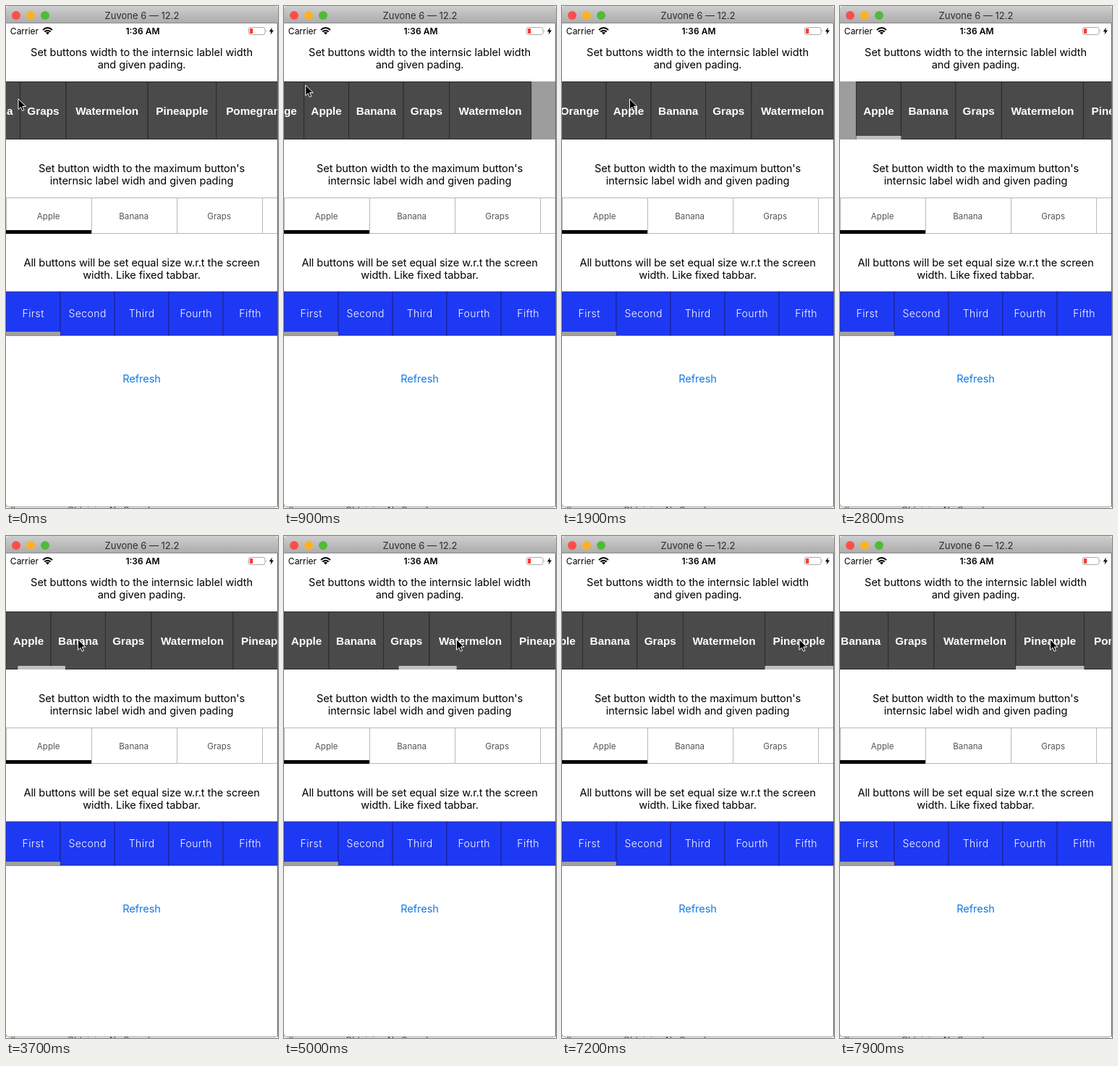
An HTML page that plays this animation: 376 px wide and 692 px high, repeating every 8 s.

```html
<!DOCTYPE html>
<html lang="en">
<head>
<meta charset="utf-8">
<style>
  html, body { margin: 0; width: 100%; height: 100%; overflow: hidden; background: #fff; }
  svg { display: block; width: 376px; height: 692px; }
  text { font-family: Inter, Roboto, sans-serif; text-anchor: middle; }
  .head { font-size: 14.6px; letter-spacing: -.07px; }
  .fruit { font: bold 15.3px "Liberation Sans", Arial, sans-serif; fill: #fff; }
  .cell { font-size: 11.6px; fill: #555; }
  .tab { font-size: 14px; font-weight: 300; letter-spacing: .45px; fill: #fff; }
  .status { font-size: 12px; }
  .behind { font-size: 12px; fill: #444; text-anchor: start; }
</style>
</head>
<body>
<svg viewBox="0 0 376 692">
  <defs>
    <linearGradient id="chrome" x2="0" y2="1">
      <stop stop-color="#cecece"/><stop offset="1" stop-color="#ababab"/>
    </linearGradient>
    <clipPath id="window"><rect width="375" height="692"/></clipPath>
    <clipPath id="edge"><rect y="690" width="376" height="2"/></clipPath>
  </defs>

  <!-- window frame -->
  <path d="M0 24V4Q0 0 4 0H372Q376 0 376 4V24Z" fill="url(#chrome)"/>
  <path d="M0 23.5H376" stroke="#8c8c8c"/>
  <g id="lights"></g>
  <text x="188" y="17.7" font-size="13" fill="#2c2c2c">Zuvone 6 — 12.2</text>
  <path d="M375.5 24V690" stroke="#666"/>
  <path d="M0 687Q0 690.5 4 690.5H371Q375.5 690.5 375.5 687" fill="none" stroke="#999"/>
  <g clip-path="url(#edge)">
    <text class="behind" x="0" y="698.5">allow</text>
    <text class="behind" x="85" y="698.5">Obtaining No Sound</text>
  </g>

  <!-- status bar -->
  <text class="status" x="25.5" y="38.7">Carrier</text>
  <text class="status" x="189" y="38.7" font-weight="600">1:36 AM</text>
  <g fill="none" stroke="#000" stroke-width="2">
    <path d="M51 33Q57.5 27 64 33M53.3 35.6Q57.5 31.8 61.7 35.6"/>
    <path d="M55 36.7Q57.5 34.6 60 36.7L57.5 39.4Z" fill="#000" stroke="none"/>
  </g>
  <rect x="335.5" y="29.5" width="22.5" height="10" rx="2.5" fill="none" stroke="#aaa"/>
  <rect x="337" y="31" width="4.3" height="7" rx="1" fill="#fb3b30"/>
  <path d="M359.5 32.7Q361.3 34.5 359.5 36.3Z" fill="#aaa"/>
  <path d="M368 29.5L363.8 35.2H366.5L365.7 39.5L370 33.6H367.2Z"/>

  <g id="heads"></g>

  <g clip-path="url(#window)">
    <rect y="104" width="375" height="80" fill="#9d9d9d"/>
    <g id="fruits"></g>
    <g id="cells"></g>
    <rect y="309" width="118" height="5"/>
    <g id="tabs"></g>
    <rect y="449" width="75" height="5" fill="#a0a0a0"/>
  </g>

  <text class="head" x="187.5" y="518.5" fill="#117ae4">Refresh</text>
  <path id="cursor" d="M0 0V14.6L3.4 11.4L5.6 16.5L8 15.5L5.8 10.5H10.4Z" stroke="#fff" stroke-linejoin="round"/>
</svg>
<script>
const $ = id => document.getElementById(id);

function add(parent, tag, attrs, content = '') {
  const el = document.createElementNS('http://www.w3.org/2000/svg', tag);
  for (const key in attrs) el.setAttribute(key, attrs[key]);
  el.textContent = content;
  $(parent).append(el);
  return el;
}
const label = (parent, cls, x, y, content) => add(parent, 'text', { class: cls, x, y }, content);
const box = (parent, x, y, width, height, fill, stroke) =>
  add(parent, 'rect', { x, y, width, height, fill, stroke });

['#fc4e49', '#fdb225', '#50bb38'].forEach((fill, i) =>
  add('lights', 'circle', { cx: 14 + 20 * i, cy: 13, r: 6, fill }));

function heading(y, ...lines) {
  lines.forEach((line, i) => label('heads', 'head', 187.6, y + 17.5 * i, line));
}
heading(68.8, 'Set buttons width to the internsic lablel width', 'and given pading.');
heading(228.8, "Set button width to the maximum button's", 'internsic label widh and given pading');
heading(358.8, 'All buttons will be set equal size w.r.t the screen', 'width. Like fixed tabbar.');

const fruits = {
  Apple: 62, Banana: 75.5, Graps: 63.5, Watermelon: 113, Pineapple: 94.5, Pomegranate: 124, Orange: 73
};
const names = Object.keys(fruits), widths = Object.values(fruits);
const starts = [];
let end = 0;
for (let i = 0; i < 11; i++) {
  const w = widths[i % 7];
  starts.push(end);
  box('fruits', end, 104.5, w, 79, '#4a4a4a', '#2b2b2b');
  label('fruits', 'fruit', end + w / 2, 150, names[i % 7]);
  end += w;
}
const marker = box('fruits', 0, 179, 62, 5, '#c0c0c0', 'none');

names.slice(0, 4).forEach((name, i) => {
  box('cells', i * 118 + .5, 264.5, 118, 49, '#fff', '#b8b8b8');
  label('cells', 'cell', i * 118 + 58.7, 293.6, name);
});
['First', 'Second', 'Third', 'Fourth', 'Fifth'].forEach((name, i) => {
  box('tabs', i * 75, 394, 75, 60, '#1e39f4', '#1a2391');
  label('tabs', 'tab', i * 75 + 37.7, 429.4, name);
});

const smooth = p => p * p * (3 - 2 * p);
const out = p => 1 - (1 - p) ** 2;
const mix = (a, b, p) => a + (b - a) * p;

const last = end - 375;                 // furthest regular scroll
const taps = [3600, 4200, 4885, 5900];  // taps on the second to fifth button

function draw() {
  const t = performance.now() % 8000;
  const ramp = (start, length, ease = smooth) =>
    ease(Math.min(1, Math.max(0, (t - start) / length)));

  // Flick to the end and bounce, drag back and bounce, reveal the tapped button, drag a little.
  const drag = 37.5 * ramp(7200, 550);
  const scroll = 117
    + (last + 49 - 117) * ramp(0, 1100, out) - 49 * ramp(1100, 700, out)
    - (last + 46) * ramp(2000, 650) + 46 * ramp(2650, 500, out)
    + (starts[5] - 375) * ramp(5900, 300) + drag;
  $('fruits').setAttribute('transform', `translate(${-scroll})`);

  const pos = taps.reduce((sum, tap) => sum + ramp(tap, 300), 0);
  const i = Math.floor(pos);
  marker.setAttribute('x', mix(starts[i], starts[i + 1], pos - i));
  marker.setAttribute('width', mix(widths[i], widths[i + 1], pos - i));

  // The pointer leaves with the drag, then glides to each button before its tap.
  let x = 17 + 16.5 * ramp(0, 1300) + 60 * ramp(1300, 600) + 290 * ramp(2000, 600);
  taps.forEach((tap, n) => x = mix(x, starts[n + 1] + 37.5, ramp(tap - 500, 450)));
  x -= 23.5 * ramp(6500, 400) + drag;
  const y = 128 - 24.5 * (ramp(0, 1300) - ramp(1300, 600)) + 14.5 * ramp(1900, 1100);
  $('cursor').setAttribute('transform', `translate(${x} ${y})`);
  requestAnimationFrame(draw);
}
draw();
</script>
</body>
</html>
```
